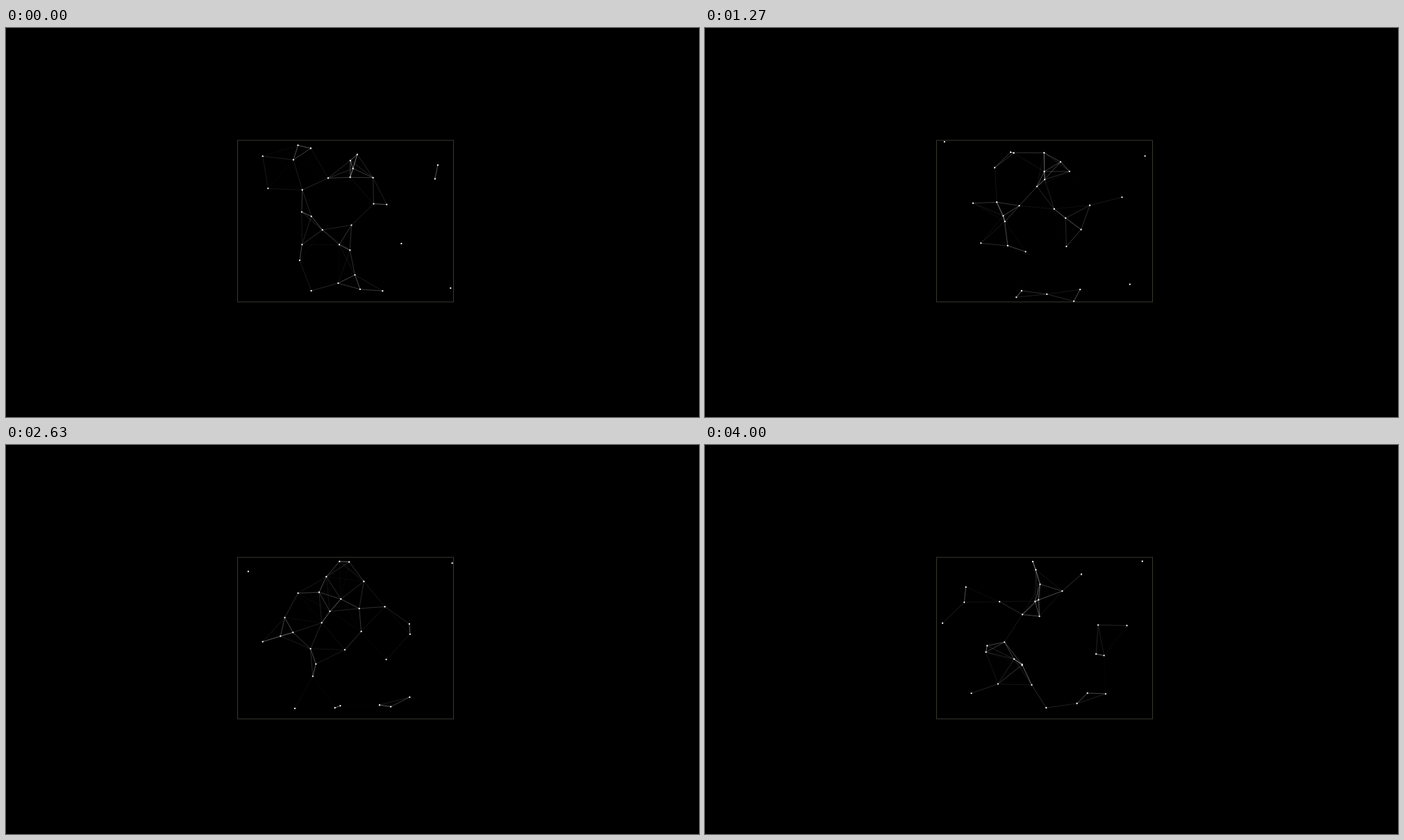
These frames come from a looping animation (998 px wide and 561 px high, 4070 ms). An HTML page with a canvas:

```html
<!DOCTYPE html>
<html lang="en">
<head>
<meta charset="utf-8">
<title>Particle network</title>
<style>
html, body { margin: 0; height: 100%; overflow: hidden; background: #000; }
canvas { display: block; }
</style>
</head>
<body>
<canvas id="stage" width="998" height="561"></canvas>
<script>
const ctx = document.getElementById('stage').getContext('2d');
const LOOP = 4070, MIDDLE = 2, FPS = 30, REACH = 58.3;
const LEFT = 333.5, RIGHT = 644.5, TOP = 162, BOTTOM = 395;

// Mid-loop x, y (walls ignored) and heading in degrees, slowest first
const particles = [
  [539, 376, 224], [485.5, 220.5, 153], [441.5, 315, 10], [419, 208, 74],
  [484, 173.5, 236], [435.5, 287, 66], [465.5, 379, 0], [640.5, 177, 312],
  [416.5, 261.5, 110], [460, 247.5, 310], [451, 328.5, 151], [451.5, 185, 27],
  [391, 265, 68], [506, 247.5, 283], [568.5, 257, 5], [535, 312, 348],
  [503, 201.5, 339], [543.5, 404, 39], [502.5, 180, 234], [595.5, 366.5, 191],
  [486.5, 400, 110], [448, 126.5, 281], [536, 221, 52], [590.5, 259.5, 123],
  [330.5, 152, 220], [414.5, 259, 218], [465.5, 243.5, 130], [525.5, 279, 216],
  [502.5, 285.5, 146], [382.5, 296, 224], [431, 400, 146]
];

// Velocities spread evenly over a disc, so ranked speeds follow a square root
const speed = rank => 5.2 * Math.sqrt(rank + 0.2);

function bounce(v, lo, hi) {
  if (v < lo) return 2 * lo - v;
  return v > hi ? 2 * hi - v : v;
}

function place([x, y, heading], rank, seconds) {
  const angle = heading * Math.PI / 180;
  const travel = speed(rank) * (seconds - MIDDLE);
  return [
    bounce(x + travel * Math.cos(angle), LEFT, RIGHT),
    bounce(y + travel * Math.sin(angle), TOP, BOTTOM)
  ];
}

// Whole steps of 1/30 s, switching on a 10 ms clock
function stepTime(ms) {
  const tick = Math.floor(ms / 10) * 10;
  return Math.min(120, Math.floor((tick + 3.34) * FPS / 1000)) / FPS;
}

function draw(now) {
  const seconds = stepTime(now % LOOP);
  const dots = particles.map((particle, rank) => place(particle, rank, seconds));

  ctx.fillStyle = '#000';
  ctx.fillRect(0, 0, 998, 561);
  ctx.lineWidth = 1;
  ctx.strokeStyle = '#383830';
  ctx.strokeRect(LEFT, TOP, RIGHT - LEFT, BOTTOM - TOP);

  ctx.lineWidth = 0.5;
  dots.forEach(([x, y], i) => {
    for (const [u, v] of dots.slice(i + 1)) {
      const near = 1 - Math.hypot(u - x, v - y) / REACH;
      if (near <= 0) continue;
      ctx.strokeStyle = `rgba(255,255,255,${near})`;
      ctx.beginPath();
      ctx.moveTo(x, y);
      ctx.lineTo(u, v);
      ctx.stroke();
    }
  });

  ctx.fillStyle = '#fff';
  for (const [x, y] of dots) {
    ctx.beginPath();
    ctx.arc(x, y, 1.15, 0, 2 * Math.PI);
    ctx.fill();
  }
}

const start = performance.now();
function frame() {
  draw(performance.now() - start);
  requestAnimationFrame(frame);
}
frame();
</script>
</body>
</html>
```
